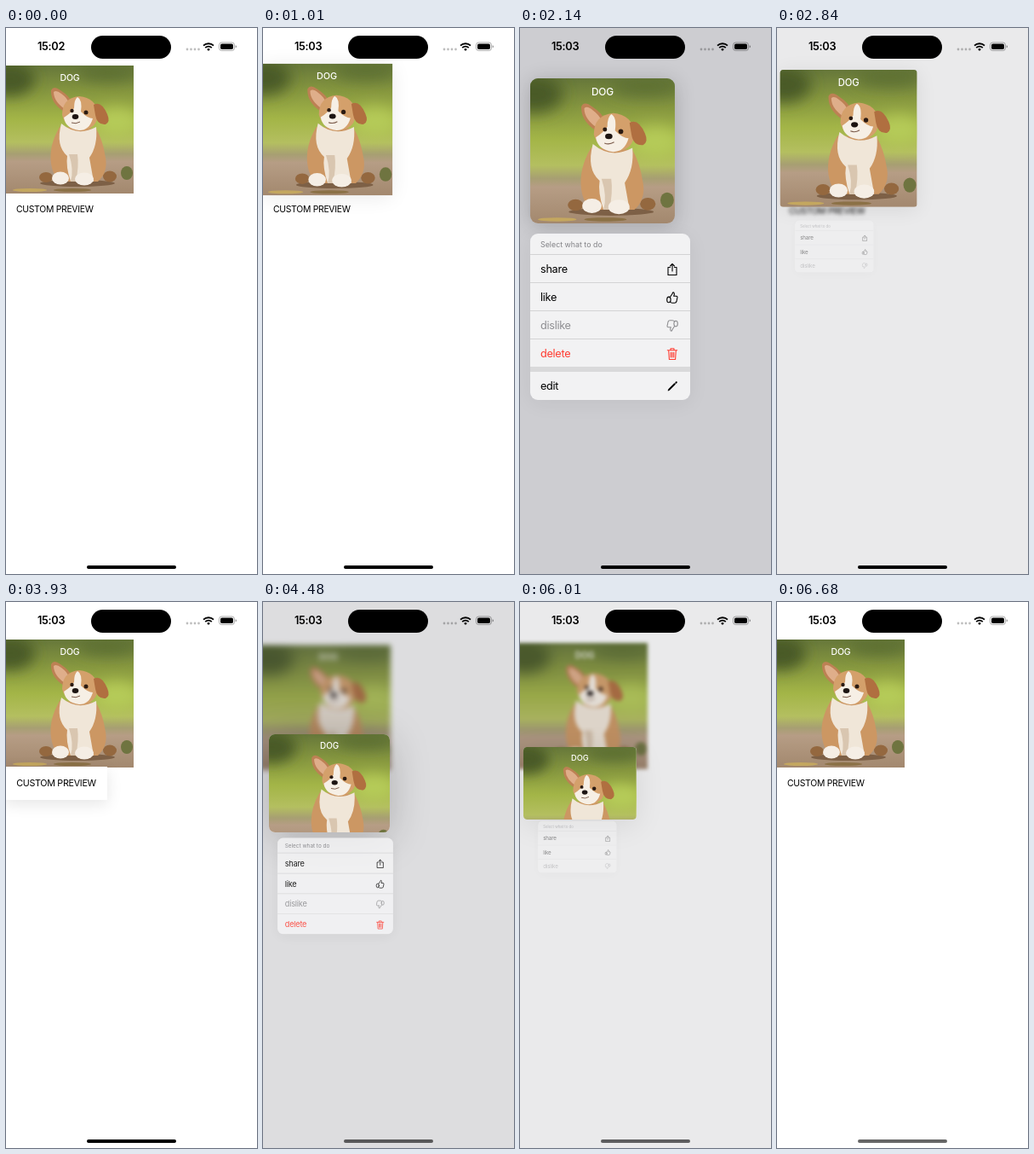
These frames come from a looping animation (295 px wide and 640 px high, 6720 ms). An HTML page:

```html
<!DOCTYPE html>
<html lang="en">
<head>
<meta charset="utf-8">
<title>Context menu with custom preview</title>
<style>
html, body { margin: 0; width: 100%; height: 100%; overflow: hidden; background: #fff; }
#stage { position: relative; width: 295px; height: 640px; overflow: hidden; background: #fff; font-family: Inter, Roboto, sans-serif; color: #000; }
#stage > *, #app > * { position: absolute; }
#app, #dim { inset: 0; }
#dim { background: rgb(70, 70, 85); }
.pic { width: 150px; height: 150px; overflow: visible; display: block; }
#app .pic { left: 0; top: 44px; }
.name { font-size: 10.5px; font-weight: 500; letter-spacing: -.1px; fill: #fff; text-anchor: middle; }
.label { left: 12px; top: 206px; font-size: 10.4px; line-height: 13px; letter-spacing: -.28px; white-space: nowrap; }
#lift { left: 0; top: 44px; width: 150px; height: 150px; overflow: hidden; }
#card { overflow: hidden; background: #fff; }
#card > * { position: absolute; transform-origin: 0 0; }
#card .pic { left: 0; top: 0; }
#card .label { left: 50%; top: 50%; transform-origin: 50% 50%; }
#menu { left: 0; top: 0; width: 188px; overflow: hidden; border-radius: 9px; transform-origin: 0 0; background: rgba(247, 247, 248, .9); box-shadow: 0 4px 25px rgba(0, 0, 0, .06); }
#menu p { margin: 0; padding-left: 12px; position: relative; height: 33px; line-height: 34px; font-size: 12.7px; letter-spacing: -.3px; box-sizing: border-box; border-top: .75px solid rgba(0, 0, 0, .13); }
#menu .title { height: 24px; line-height: 26px; font-size: 8.85px; letter-spacing: 0; color: #828286; border: 0; }
#menu .last { border-top: 6px solid rgba(0, 0, 0, .1); height: 39px; }
#menu .off { color: #8e8e91; }
#menu .red { color: #ff3b30; }
#menu svg { position: absolute; left: 159px; top: 8.5px; width: 16px; height: 16px; fill: none; stroke: currentColor; stroke-width: 1.1; stroke-linecap: round; stroke-linejoin: round; }
#clock { left: 37px; top: 14px; font-size: 12.75px; line-height: 16px; font-weight: 600; letter-spacing: -.3px; }
#bar { left: 95px; top: 630px; width: 105px; height: 4px; border-radius: 2px; background: #000; }
</style>
</head>
<body>
<svg width="0" height="0" style="position:absolute">
  <defs>
    <linearGradient id="field" x2="0" y2="1">
      <stop offset="0" stop-color="#66773a"/>
      <stop offset=".2" stop-color="#85963f"/>
      <stop offset=".42" stop-color="#a3b547"/>
      <stop offset=".6" stop-color="#b4bf60"/>
      <stop offset=".69" stop-color="#a79f72"/>
      <stop offset=".75" stop-color="#b69d85"/>
      <stop offset="1" stop-color="#a3886e"/>
    </linearGradient>
    <filter id="far" x="-50%" y="-50%" width="200%" height="200%"><feGaussianBlur stdDeviation="8"/></filter>
    <filter id="soft"><feGaussianBlur stdDeviation=".7"/></filter>
  </defs>
  <symbol id="dog" viewBox="0 0 150 150" overflow="visible">
    <rect x="-12" width="162" height="150" fill="url(#field)"/>
    <svg x="-12" width="162" height="150" viewBox="-12 0 162 150">
      <g filter="url(#far)">
        <ellipse cx="4" cy="16" rx="30" ry="20" fill="#485a27"/>
        <ellipse cx="120" cy="8" rx="36" ry="10" fill="#5d7033"/>
        <ellipse cx="130" cy="66" rx="26" ry="16" fill="#b5cb58"/>
      </g>
    </svg>
    <g filter="url(#soft)">
      <ellipse cx="28" cy="146" rx="20" ry="2" fill="#c4a75f"/>
      <ellipse cx="78" cy="146" rx="22" ry="2" fill="#8b7146"/>
      <ellipse cx="142" cy="126" rx="7" ry="8" fill="#6f7440"/>
      <ellipse cx="84" cy="138" rx="44" ry="4" fill="#7d6046"/>
      <ellipse cx="47" cy="131" rx="8" ry="6" fill="#94683f"/>
      <ellipse cx="122" cy="130" rx="8" ry="6.500" fill="#94683f"/>
      <path d="M63 72Q50 94 53 115Q56 135 70 136H108Q120 125 117 108Q114 88 106 74Z" fill="#cc9763"/>
      <path d="M65 68Q84 84 106 72Q108 94 98 108L103 136H76Q70 118 72 106Q58 94 65 68Z" fill="#f0e6d8"/>
      <path d="M74 104Q80 122 76 136H82Q86 118 84 104Z" fill="#d9c6b0"/>
      <ellipse cx="64" cy="132" rx="10" ry="7.500" fill="#f5eee5"/>
      <ellipse cx="92" cy="133" rx="11" ry="7.500" fill="#f5eee5"/>
      <path d="M73 57Q52 46 53 29Q56 23 64 29Q75 36 78 44Z" fill="#bd8154"/>
      <path d="M72 53Q56 43 56 31Q59 28 65 33Q72 38 74 44Z" fill="#dfae8a"/>
      <path d="M66 58Q66 38 86 36Q106 38 108 56Q108 73 90 76Q70 74 66 58Z" fill="#d4a06b"/>
      <path d="M84 37Q90 40 88 54Q96 62 102 62Q98 76 86 76Q70 74 68 61Q76 56 80 50Q80 40 84 37Z" fill="#f6efe5"/>
      <path d="M103 46Q112 41 119 57Q123 66 117 69Q107 70 105 58Z" fill="#b06f40"/>
      <circle cx="77.500" cy="53" r="2.200" fill="#2a1a12"/>
      <circle cx="94" cy="55" r="2.500" fill="#2a1a12"/>
      <ellipse cx="81.500" cy="60" rx="3.800" ry="2.900" fill="#1c1412"/>
      <path d="M77 67Q82 69 87 66" fill="none" stroke="#7a5a4a"/>
    </g>
    <text class="name" x="75" y="18">DOG</text>
  </symbol>
</svg>

<div id="stage">
  <div id="app">
    <svg class="pic" id="rowPic"><use href="#dog" width="150" height="150"/></svg>
    <div class="label" id="rowLabel">CUSTOM PREVIEW</div>
  </div>
  <div id="dim"></div>
  <div id="lift"><svg class="pic"><use href="#dog" width="150" height="150"/></svg></div>
  <div id="card">
    <svg class="pic" id="cardPic"><use href="#dog" width="150" height="150"/></svg>
    <div class="label" id="cardLabel">CUSTOM PREVIEW</div>
  </div>
  <div id="menu">
    <p class="title">Select what to do</p>
    <p>share<svg viewBox="0 0 16 16"><path d="M5.500 5.500H3V14.500H13V5.500H10.500M8 10V1.500M5.500 4 8 1.500 10.500 4"/></svg></p>
    <p>like<svg viewBox="0 0 16 16"><g id="thumb"><path d="M5.200 7.800 8 3.500Q8.600 1.200 9.900 2.100Q11 3.500 9.700 6.200H12.600Q14.300 6.500 13.900 8L13 12.500Q12.500 14.200 10.800 14.200H8Q6.200 14.200 5.200 12.800"/><ellipse cx="3.900" cy="10.400" rx="2.200" ry="3.300"/></g></svg></p>
    <p class="off">dislike<svg viewBox="0 0 16 16"><use href="#thumb" transform="rotate(180 8 8)"/></svg></p>
    <p class="red">delete<svg viewBox="0 0 16 16"><path d="M2.300 3.800H13.700M3.700 3.800 4.400 14.500H11.600L12.300 3.800M6 3.800V1.800H10V3.800M6.200 6.200V12M8 6.200V12M9.800 6.200V12"/></svg></p>
    <p class="last">edit<svg viewBox="0 0 16 16"><path stroke-width="2" d="M4.300 11.800 10.800 5.300M12.400 3.700 12.800 3.300"/><path d="M3.200 12.900 4 12.100"/></svg></p>
  </div>
  <div id="clock">15:02</div>
  <svg width="295" height="40" style="left:0;top:0">
    <rect x="100" y="9" width="94" height="27" rx="13.500"/>
    <g opacity=".25"><circle cx="213" cy="25" r="1.400"/><circle cx="217.500" cy="25" r="1.400"/><circle cx="222" cy="25" r="1.400"/><circle cx="226.500" cy="25" r="1.400"/></g>
    <g fill="none" stroke="#000" stroke-width="1.800"><path d="M232 20.700a8.600 8.600 0 0 1 12 0M234.200 23.200a5.400 5.400 0 0 1 7.600 0"/></g>
    <path d="M236.200 24.900a2.600 2.600 0 0 1 3.600 0L238 26.900Z"/>
    <rect x="250.500" y="17" width="18" height="9.500" rx="3" fill="none" stroke="#000" stroke-opacity=".4" stroke-width=".8"/>
    <rect x="252" y="18.500" width="15" height="6.500" rx="1.800"/>
    <path d="M269.700 20.300q1.300 .3 1.300 1.500t-1.300 1.500Z" opacity=".45"/>
  </svg>
  <div id="bar"></div>
</div>

<script>
const LOOP = 6720;
// [first, last, count] runs of screen updates
const runs = [[780, 1450, 7], [1560, 2140, 6], [2720, 3290, 6], [3400, 3400, 1],
  [3710, 4370, 7], [4480, 5150, 7], [5290, 5290, 1], [5900, 6560, 7], [6680, 6680, 1]];
const steps = [0];
for (const [a, b, n] of runs)
  for (let i = 0; i < n; i++) steps.push(n > 1 ? a + Math.floor((b - a) * i / (n - 1) / 10) * 10 : a);

const picture = { lift: 690, open: 1416, close: 2690, end: 3400 };
const label = { lift: 3600, open: 4362, close: 5870, end: 6680 };

const $ = id => document.getElementById(id);
const clamp = v => Math.min(1, Math.max(0, v));
const lerp = (a, b, p) => a + (b - a) * p;
const spring = x => x <= 0 ? 0 : 1 - Math.exp(-x) * (1 + x);
const show = (id, on) => { $(id).style.visibility = on ? "visible" : "hidden"; };

function progress(s, t) {
  const closing = t >= s.close;
  const p = closing ? 1 - spring((t - s.close) * .014) : spring((t - s.open) * .02);
  return { p, up: closing ? p : clamp((t - s.lift) / 700) };
}

function drawLift(p, up) {
  const el = $("lift").style, k = lerp(1 + .07 * up, 1.133, p);
  el.transform = `translate(${22 * p}px, ${25 * p}px) scale(${k})`;
  el.borderRadius = 8 * p + "px";
  el.boxShadow = `0 3px 22px rgba(0,0,0,${.2 * up})`;
}

function drawCard(p, up) {
  const el = $("card").style, k = 1 + .07 * up;
  const w = lerp(117 * k, 150, p), h = lerp(37 * k, 150, p);
  el.left = lerp(58.5, 87, p) - w / 2 + "px";
  el.top = lerp(212.5, 213, p) - h / 2 + "px";
  el.width = w + "px";
  el.height = h + "px";
  el.borderRadius = 8 * clamp(p * 1.3) + "px";
  el.boxShadow = `0 ${lerp(5, 8, p)}px ${lerp(18, 60, p)}px rgba(0,0,0,${.22 * up})`;
  const mix = clamp(p * 2.5);
  $("cardPic").style.transform = `scale(${w / 150})`;
  $("cardPic").style.opacity = mix;
  $("cardLabel").style.transform = `translate(-50%, -50%) scale(${k})`;
  $("cardLabel").style.opacity = 1 - mix;
}

function drawMenu(p, from, to) {
  const el = $("menu").style;
  el.transform = `translate(${lerp(28, 12, p)}px, ${lerp(from, to, p)}px) scale(${lerp(.125, 1, p)})`;
  el.height = lerp(73, 195, p) + "px";
  el.opacity = clamp((p - .15) / .63);
}

function render(now) {
  const t = steps.filter(s => s <= now).pop();
  const first = t < 3500, s = first ? picture : label;
  const active = t >= s.lift && t < s.end;
  const { p, up } = active ? progress(s, t) : { p: 0, up: 0 };

  show("lift", active && first);
  show("rowPic", !(active && first));
  show("card", active && !first);
  show("rowLabel", !(active && !first));
  if (first) drawLift(p, up); else drawCard(p, up);
  drawMenu(p, first ? 215 : 226, first ? 241 : 300);

  $("app").style.transform = p > .01 ? `scale(${1 - .035 * p})` : "none";
  $("app").style.filter = p > .01 ? `blur(${5 * p}px)` : "none";
  $("dim").style.opacity = .27 * p;
  $("clock").textContent = t < 780 ? "15:02" : "15:03";
  $("bar").style.opacity = 1 - .4 * clamp((t - 4000) / 370);
}

const start = performance.now();
function tick() {
  render((performance.now() - start) % LOOP);
  requestAnimationFrame(tick);
}
tick();
</script>
</body>
</html>
```
